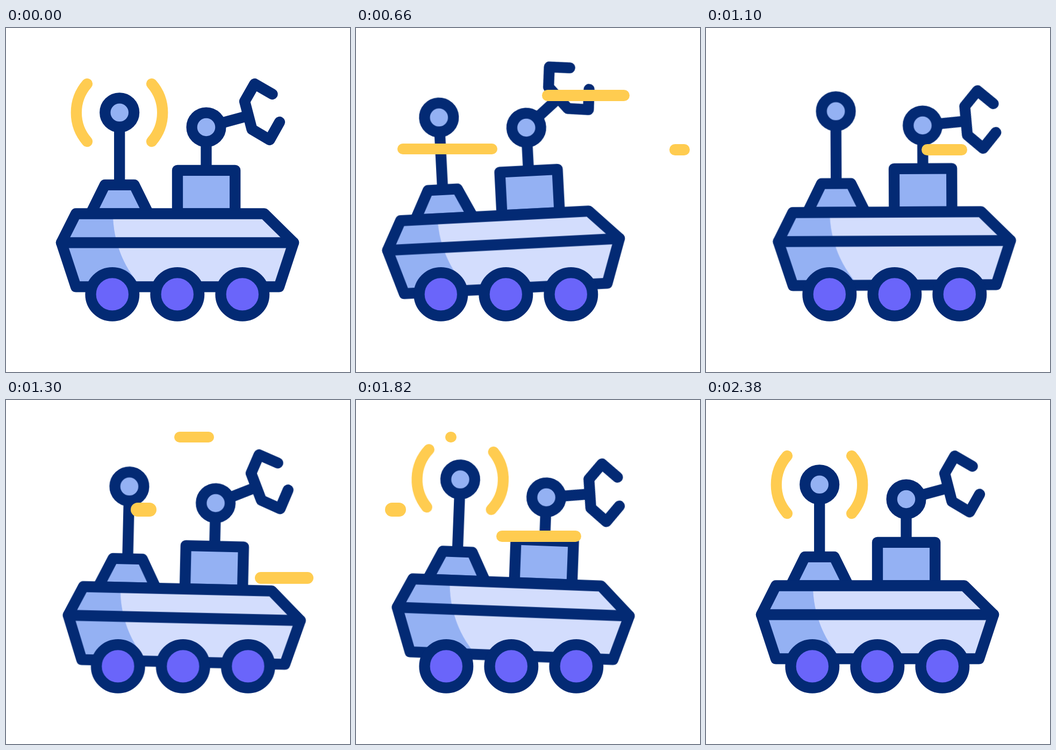
An HTML page that plays this animation: 640 px wide and 640 px high, repeating every 2400 ms.

```html
<!DOCTYPE html>
<html lang="en">
<head>
<meta charset="utf-8">
<title>Rover</title>
<style>
  :root {
    --navy: #032a74;
    --blue: #94b1f3;
    --pale: #d3ddfd;
    --violet: #6a65fa;
    --yellow: #ffcc50;
    --ease: cubic-bezier(.333, 0, .667, 1);
  }
  html, body { margin: 0; width: 100%; height: 100%; overflow: hidden; background: #fff; }
  .stage { position: relative; width: 640px; height: 640px; overflow: hidden; }
  svg { position: absolute; inset: 0; display: block; }

  .ink { stroke: var(--navy); stroke-width: 20.3; stroke-linecap: round; stroke-linejoin: round; fill: none; }
  .blue { fill: var(--blue); }
  .wheels { fill: var(--violet); }
  .arcs { stroke: var(--yellow); stroke-width: 20.3; stroke-linecap: round; fill: none; }

  .drive, .lift, .tilt, .arm, .arcs { animation: 2400ms var(--ease) infinite; }
  .drive { animation-name: drive; }
  .lift { animation-name: lift; }
  .tilt { animation-name: tilt; transform-origin: 319px 491px; }
  .arm { animation-name: arm; transform-origin: 372.5px 184.5px; }
  .arcs { animation-name: signal; transform-origin: 211px 157px; }

  @keyframes drive {
    0%, 100% { transform: translateX(0); }
    24.6% { transform: translateX(-44px); }
    45.6% { transform: translateX(32px); }
    69.4% { transform: translateX(-40px); }
    89.2% { transform: translateX(0); }
  }
  @keyframes lift {
    0%, 100% { transform: translateY(0); }
    12.5% { transform: translateY(-4px); }
    26% { transform: translateY(4px); }
    37.5% { transform: translateY(-12px); }
    54.2% { transform: translateY(6px); }
    78.3% { transform: translateY(-6px); }
    93.8% { transform: translateY(0); }
  }
  @keyframes tilt {
    0%, 100% { transform: rotate(0deg); }
    24.6% { transform: rotate(-3deg); }
    69.4% { transform: rotate(2.9deg); }
    89.2% { transform: rotate(0deg); }
  }
  @keyframes arm {
    0%, 100% { transform: rotate(0deg); }
    25.8% { transform: rotate(-26.5deg); }
    39.2% { transform: rotate(17deg); }
    60.4% { transform: rotate(-14deg); }
    85% { transform: rotate(18.8deg); }
  }
  @keyframes signal {
    0%, 73%, 100% { transform: scale(1); opacity: 1; }
    11%, 62.2% { transform: scale(.2); opacity: 0; }
  }

  /* Speed streak: the head runs 200px left, the tail follows later. */
  .streak {
    position: absolute;
    left: calc(var(--x) - var(--h) / 2);
    right: calc(640px - var(--x) - var(--h) / 2);
    top: calc(var(--y) - var(--h) / 2);
    height: var(--h);
    border-radius: 99px;
    background: var(--yellow);
    --h: 20.5px;
    animation: 2400ms var(--ease) calc(var(--t) - 2400ms) infinite;
    animation-name: head, tail, show;
  }
  @keyframes head {
    16.67%, 100% { left: calc(var(--x) - 200px - var(--h) / 2); }
  }
  @keyframes tail {
    0%, 11.04% { right: calc(640px - var(--x) - var(--h) / 2); }
    27.7%, 100% { right: calc(840px - var(--x) - var(--h) / 2); }
  }
  @keyframes show {
    0% { opacity: 1; animation-timing-function: step-end; }
    27.8%, 100% { opacity: 0; animation-timing-function: step-end; }
  }
</style>
</head>
<body>
<div class="stage">
  <svg width="640" height="640" viewBox="0 0 640 640">
    <defs>
      <path id="hull" d="M130 345.5H480.5L535 399.3 508 481.3H130L103 399.3Z"/>
      <clipPath id="inside"><use href="#hull"/></clipPath>
    </defs>
    <g class="drive">
      <g class="lift"><g class="tilt">
        <g class="arcs">
          <path d="M151 103.8A81.5 81.5 0 0 0 151 211.2"/>
          <path d="M271 103.8A81.5 81.5 0 0 1 271 211.2"/>
        </g>
        <g class="ink">
          <path d="M211.2 157V291"/>
          <circle class="blue" cx="211.2" cy="157.3" r="26.9"/>
          <path class="blue" d="M157.5 345.5 184 291.8H238.5L265 345.5Z"/>
          <path d="M372.5 184V265"/>
          <path class="blue" d="M319 264.8H426.2V345.5H319Z"/>
          <g class="arm">
            <path d="M372.5 184.5 450 163.5"/>
            <path d="M495.5 123 462.5 104 444 136.5 457.5 188.5 490.5 208 509 175"/>
          </g>
          <circle class="blue" cx="372.5" cy="184.5" r="26.9"/>
        </g>
        <use href="#hull" class="blue"/>
        <g clip-path="url(#inside)"><circle cx="402" cy="345" r="203" fill="#d3ddfd"/></g>
        <g class="ink">
          <use href="#hull"/>
          <path d="M103 399.3H535"/>
        </g>
      </g></g>
      <g class="ink">
        <g class="wheels">
          <circle cx="197.8" cy="495.4" r="40.3"/>
          <circle cx="318.8" cy="495.4" r="40.3"/>
          <circle cx="439.8" cy="495.4" r="40.3"/>
        </g>
      </g>
    </g>
  </svg>
  <div class="streak" style="--x:556px; --y:125.5px; --t:255ms"></div>
  <div class="streak" style="--x:257px; --y:225.2px; --t:360ms"></div>
  <div class="streak" style="--x:611px; --y:226.7px; --t:588ms"></div>
  <div class="streak" style="--x:561px; --y:330.5px; --t:1118ms; --h:22px"></div>
  <div class="streak" style="--x:376.5px; --y:69px; --t:1166ms"></div>
  <div class="streak" style="--x:267px; --y:204px; --t:1218ms; --h:25.5px"></div>
  <div class="streak" style="--x:471px; --y:253.5px; --t:1408ms"></div>
</div>
</body>
</html>
```
